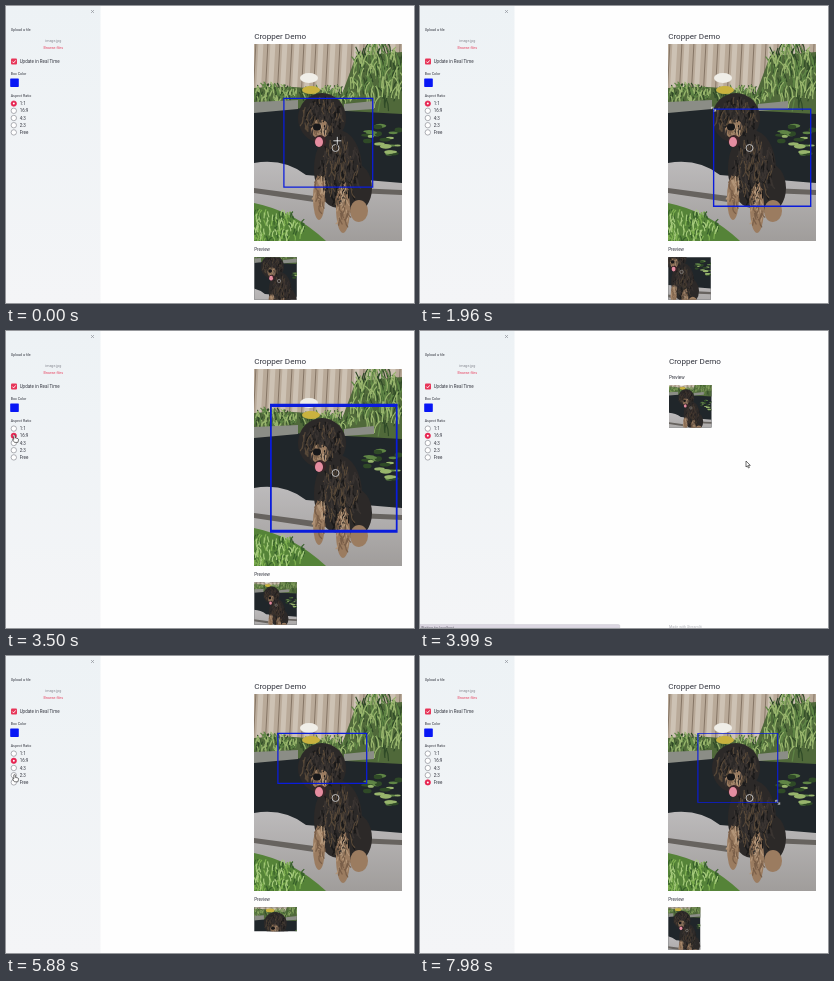
An HTML page that plays this animation: 408x297 px, repeating every 8000 ms.

```html
<!DOCTYPE html>
<html lang="en">
<head>
<meta charset="utf-8">
<title>Cropper Demo</title>
<style>
  html, body { margin: 0; width: 100%; height: 100%; overflow: hidden; background: #fefefe; }
  #stage { display: block; width: 100vw; height: 100vh; }
  text { font-family: Roboto, "Open Sans", sans-serif; fill: #33353f; }
  .label { font-size: 3.65px; }
  .body { font-size: 4.5px; }
</style>
</head>
<body>
<svg id="stage" viewBox="0 0 408 297">
  <defs>
    <linearGradient id="side" x2="0" y2="1">
      <stop stop-color="#edf2f5"/><stop offset="1" stop-color="#f4f5f7"/>
    </linearGradient>
    <linearGradient id="stone" x2="0" y2="1">
      <stop stop-color="#bcbabb"/><stop offset="1" stop-color="#a09d9b"/>
    </linearGradient>
    <pattern id="planks" width="12" height="60" patternUnits="userSpaceOnUse" patternTransform="rotate(3)">
      <path fill="#b9aa99" d="M0 0h12v60H0z"/>
      <path fill="#cdc2b4" d="M2 0h5v60H2z"/>
      <path fill="#857565" d="M11 0h1v60h-1z"/>
    </pattern>
    <clipPath id="frame"><path d="M248 38h148v197H248z"/></clipPath>

    <g id="photo" clip-path="url(#frame)">
      <path fill="#20262a" d="M248 38h148v197H248z"/>
      <path fill="url(#planks)" d="M248 38h148v54H248z"/>
      <path fill="#50693a" d="M248 82q50-4 88 6l14-38 46-4v62l-148-8z"/>
      <g id="plants"></g>
      <path fill="#8b8d86" d="M248 96l44-2v9l-44 4zM338 98l30-3v8l-30 2z"/>
      <ellipse cx="303" cy="72" rx="9" ry="5" fill="#f0eee8"/>
      <ellipse cx="305" cy="84" rx="9" ry="4" fill="#c9b23f"/>
      <g id="pads"></g>
      <path fill="url(#stone)" d="M248 157q30-5 52 12l96 8v58H248z"/>
      <path fill="#67635f" d="M248 182l60 8v6l-60-9zM350 182l46 2v5l-46-2z"/>
      <path fill="#558338" d="M248 197q40 8 72 38h-72z"/>
      <g id="grass"></g>
      <g fill="#2c2928">
        <ellipse cx="332" cy="163" rx="24" ry="39"/>
        <ellipse cx="348" cy="182" rx="18" ry="25"/>
        <ellipse cx="316" cy="112" rx="24" ry="25"/>
      </g>
      <g fill="#9b7c60">
        <ellipse cx="313" cy="192" rx="6" ry="22"/>
        <ellipse cx="337" cy="202" rx="7" ry="25"/>
        <ellipse cx="353" cy="205" rx="9" ry="11"/>
        <ellipse cx="314" cy="123" rx="9" ry="10"/>
      </g>
      <g id="fur"></g>
      <ellipse cx="311" cy="121" rx="4" ry="3.5" fill="#171719"/>
      <ellipse cx="314" cy="135" rx="6" ry="6" fill="#3c2428"/>
      <ellipse cx="313" cy="136" rx="4" ry="5" fill="#e58da0"/>
      <circle cx="329.5" cy="142" r="3.5" fill="none" stroke="#c7c8ca" stroke-width=".9"/>
    </g>

    <path id="arrow" fill="#fff" stroke="#222" stroke-width=".65" d="M0 0v6l1.4-1.2 1 2.2 1-.5-1-2.1h1.9z"/>
    <path id="hand" fill="#fff" stroke="#222" stroke-width=".6" d="M-.7 0q.8-.8 1.5 0v2.4l2.7.7q.7.3.5 1.4l-.6 2.4H0L-2 4.2q0-1 1.3-.3z"/>
    <g id="move" fill="none">
      <path id="cross" stroke="#222" stroke-width="1.6" d="M-4 0h8M0-4v8M-1.2-2.8L0-4l1.2 1.2M-1.2 2.8L0 4l1.2-1.2"/>
      <path stroke="#fff" stroke-width=".8" d="M-4 0h8M0-4v8"/>
    </g>
    <path id="size" fill="none" stroke="#ddd" stroke-width=".7" d="M-2-2l4 4M-2 0v-2h2M2 0v2h-2"/>
  </defs>

  <rect width="408" height="297" fill="#fefefe"/>
  <rect width="94.5" height="297" fill="url(#side)"/>
  <path stroke="#8b8e96" stroke-width=".65" d="M85 4l3 3m0-3l-3 3"/>
  <text class="label" x="4.7" y="25.2">Upload a file</text>
  <text class="label" x="47.3" y="36" text-anchor="middle" style="fill:#85878f">image.jpg</text>
  <text class="label" x="47.3" y="43" text-anchor="middle" style="fill:#e8405e">Browse files</text>
  <rect x="5" y="52.6" width="6" height="6" rx="1" fill="#e73558"/>
  <path fill="none" stroke="#fff" stroke-width=".9" d="M6.4 55.6l1.2 1.3 2.1-2.5"/>
  <text class="body" x="13.7" y="57.2">Update in Real Time</text>
  <text class="label" x="4.7" y="69.3">Box Color</text>
  <rect x="4.2" y="72.4" width="8.6" height="8.6" rx=".7" fill="#0716f5"/>
  <text class="label" x="4.7" y="90.6">Aspect Ratio</text>
  <g id="radios"></g>

  <g id="page">
    <text x="248.2" y="33.1" font-size="8.1">Cropper Demo</text>
    <g id="canvas">
      <use href="#photo"/>
      <path id="box" fill="#0a1cdc" fill-rule="evenodd"/>
    </g>
    <g id="result">
      <text x="248.2" y="245.2" font-size="4.5">Preview</text>
      <svg id="thumb" x="248.3" y="251.3" preserveAspectRatio="none"><use href="#photo"/></svg>
    </g>
  </g>
  <g id="status">
    <text x="249" y="297" font-size="3.7" style="fill:#b4b5bb">Made with Streamlit</text>
    <path fill="#dcd7e2" stroke="#c3bfca" stroke-width=".4" d="M0 293.6h198.5q1.3 0 1.3 1.3V297H0z"/>
    <text x="1" y="297.8" font-size="3.6" style="fill:#62606a">Waiting for localhost...</text>
  </g>
  <use id="cursor"/>
</svg>
<script>
const LOOP = 8000, STEP = 70, THUMB = 42.5, LINE = 1.25;
const RELOAD = 850, REFRESH = 150;
const PHOTO = { x: 248.3, y: 38, w: 148, h: 197 };
const $ = id => document.getElementById(id);

function add(parent, tag, attrs, text = '') {
  const el = document.createElementNS('http://www.w3.org/2000/svg', tag);
  for (const k in attrs) el.setAttribute(k, attrs[k]);
  el.textContent = text;
  return parent.appendChild(el);
}

let seed = 7;
const rand = (a, b) => {
  seed = seed * 16807 % 2147483647;
  return a + (b - a) * seed / 2147483647;
};

// Random point in an ellipse
function spot([cx, cy, rx, ry]) {
  const a = rand(0, 2 * Math.PI), r = Math.sqrt(rand(0, 1));
  return [cx + rx * r * Math.cos(a), cy + ry * r * Math.sin(a)];
}

function tufts(id, area, count, len, colors) {
  for (const stroke of colors) {
    let d = '';
    for (let i = 0; i < count; i++) {
      d += `M${spot(area)}q${rand(-2, 2)} ${len * .6} ${rand(-.5, .5) * len} ${len}`;
    }
    add($(id), 'path', { d, stroke, fill: 'none', 'stroke-width': 1.2 });
  }
}

const leaf = ['#2f4a27', '#5f8545', '#98b56c'];
const coat = ['#191818', '#574838', '#3a3431'];
const tan = ['#b4977a', '#7a5f49'];
tufts('plants', [372, 76, 28, 32], 60, -12, leaf);
tufts('plants', [268, 90, 24, 9], 35, -6, leaf);
tufts('plants', [322, 92, 28, 8], 30, -6, leaf);
tufts('grass', [262, 224, 40, 16], 60, -6, ['#37602a', '#7fb050', '#a4c97a']);
tufts('fur', [316, 108, 20, 18], 40, 7, coat);
tufts('fur', [334, 160, 20, 32], 60, 9, coat);
tufts('fur', [314, 184, 6, 18], 14, 7, tan);
tufts('fur', [337, 196, 6, 22], 18, 7, tan);
tufts('fur', [314, 121, 7, 6], 9, 5, tan);
for (let i = 0; i < 22; i++) {
  const [cx, cy] = spot([378, 134, 20, 16]);
  add($('pads'), 'ellipse', { cx, cy, rx: rand(3, 6), ry: rand(1, 2.5), fill: leaf[i % 3] });
}

// The default box starts at 20% of the photo and is 60% wide
const ratios = { '1:1': 1, '16:9': 16 / 9, '4:3': 4 / 3, '2:3': 2 / 3, Free: PHOTO.w / PHOTO.h };
const names = Object.keys(ratios);
const defaultBox = name => [
  PHOTO.x + .2 * PHOTO.w, PHOTO.y + .2 * PHOTO.h, .6 * PHOTO.w, .6 * PHOTO.w / ratios[name]
];
const radioY = i => 97.6 + 7.2 * i;

const radios = names.map((name, i) => {
  const cy = radioY(i);
  add($('radios'), 'text', { class: 'body', x: 13.7, y: cy + 1.6 }, name);
  return {
    ring: add($('radios'), 'circle', { cx: 7.8, cy, r: 2.7, 'stroke-width': .65 }),
    dot: add($('radios'), 'circle', { cx: 7.8, cy, r: 1, fill: '#fff' })
  };
});

// How each gesture changes the box, and where it holds it
const gestures = {
  move: { cursor: 'move', edit: ([x, y, w, h], [dx, dy]) => [x + dx, y + dy, w, h], hold: ([x, y, w, h]) => [x + w / 2 + 9, y + h / 2 - 2] },
  nw: { cursor: 'size', edit: ([x, y, w, h], [dx, dy]) => [x + dx, y + dy, w - dx, h - dy], hold: ([x, y]) => [x, y] },
  se: { cursor: 'size', edit: ([x, y, w, h], [dx, dy]) => [x, y, w + dx, h + dy], hold: ([x, y, w, h]) => [x + w, y + h] }
};
const steps = [
  { from: 0, to: 400, drag: 'move', by: [-8, -22] },
  { from: 600, to: 1190, drag: 'move', by: [32, 41] },
  { from: 1700, to: 2550, drag: 'nw', by: [-37, -37] },
  { from: 3450, to: 3520, pick: '16:9' },
  { from: 3950, to: 4450, rest: [326, 130] },
  { from: 4750, to: 5300, drag: 'move', by: [-6, 0] },
  { from: 5860, to: 5900, hover: '2:3' },
  { from: 6090, to: 6240, pick: 'Free' },
  { from: 6700, to: 7080, rest: [329.6, 134.3] },
  { from: 7400, to: LOOP, drag: 'se', by: [-9, -49.5] }
];

// Work out box and pointer at both ends of every step
const firstBox = gestures.move.edit(defaultBox('1:1'), [0, 15]);
let box = firstBox, mode = '1:1';
for (const s of steps) {
  const g = gestures[s.drag], choice = s.pick || s.hover;
  s.before = box;
  if (g) box = g.edit(box, s.by);
  if (s.pick) box = defaultBox(mode = s.pick);
  s.after = box;
  s.base = defaultBox(mode);
  s.cursor = g ? g.cursor : choice ? 'hand' : 'arrow';
  const still = choice ? [8.5, radioY(names.indexOf(choice)) - .3] : s.rest;
  s.start = g ? g.hold(s.before) : still;
  s.end = g ? g.hold(s.after) : still;
  s.ready = s.to + (s.pick ? RELOAD : REFRESH);
}

function mix(a, b, t, from, to) {
  const p = Math.min(1, (t - from) / (to - from)), e = p * p * (3 - 2 * p);
  return a.map((v, i) => v + (b[i] - v) * e);
}

const rectPath = (x, y, w, h) => `M${x} ${y}h${w}v${h}h${-w}z`;

function drawBox([x, y, w, h], base) {
  // The outline scales with the box
  const sx = LINE * w / base[2], sy = LINE * h / base[3];
  $('box').setAttribute('d', rectPath(x - sx / 2, y - sy / 2, w + sx, h + sy)
    + rectPath(x + sx / 2, y + sy / 2, w - sx, h - sy));
}

function drawThumb(crop) {
  const fit = THUMB / Math.max(crop[2], crop[3]);
  $('thumb').setAttribute('viewBox', crop.join(' '));
  $('thumb').setAttribute('width', crop[2] * fit);
  $('thumb').setAttribute('height', crop[3] * fit);
}

function draw(t) {
  const last = steps.filter(s => s.from <= t).pop();
  const next = steps[steps.indexOf(last) + 1];
  const active = t <= last.to;
  const picked = steps.filter(s => s.pick && s.from <= t).pop();
  const loading = picked && t >= picked.to && t < picked.ready;
  const shown = steps.filter(s => s.ready <= t).pop();

  radios.forEach(({ ring, dot }, i) => {
    const on = names[i] === (picked ? picked.pick : '1:1');
    ring.setAttribute('fill', on ? '#e62350' : '#fff');
    ring.setAttribute('stroke', on ? '#e62350' : '#85878e');
    dot.setAttribute('visibility', on ? 'visible' : 'hidden');
  });

  $('canvas').style.display = loading ? 'none' : '';
  $('status').style.display = loading ? '' : 'none';
  $('page').setAttribute('transform', `translate(${loading ? .7 : 0} 0)`);
  $('result').setAttribute('transform', `translate(0 ${loading ? -197.2 : 0})`);

  drawBox(last.pick && active ? last.before : mix(last.before, last.after, t, last.from, last.to), last.base);
  drawThumb(shown ? shown.after : firstBox);

  const pointer = active || !next
    ? mix(last.start, last.end, t, last.from, last.to)
    : mix(last.end, next.start, t, last.to, next.from);
  $('cursor').setAttribute('href', '#' + (active ? last.cursor : 'arrow'));
  $('cursor').setAttribute('transform', `translate(${pointer.join(' ')})`);
}

const start = performance.now();
function tick() {
  const t = (performance.now() - start) % LOOP;
  draw(Math.floor(t / STEP) * STEP);
  requestAnimationFrame(tick);
}
tick();
</script>
</body>
</html>
```
